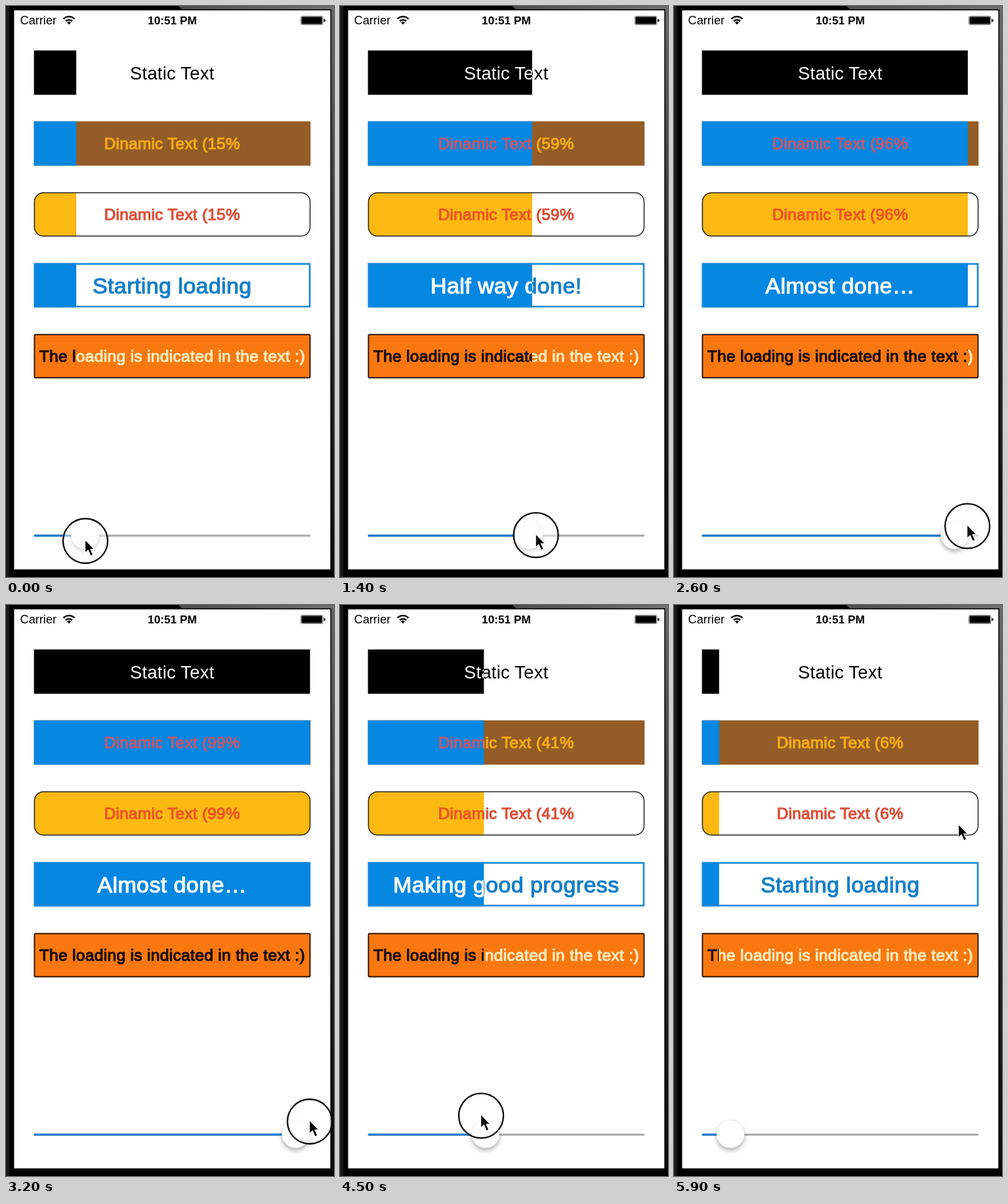
An HTML page that plays this animation: 500x870 px, repeating every 6 s.

```html
<!DOCTYPE html>
<html lang="en">
<head>
<meta charset="utf-8">
<title>Progress bars</title>
<style>
html, body { margin: 0; width: 100%; height: 100%; overflow: hidden; background: #000; }
svg { display: block; width: 500px; height: 870px; font-family: "Liberation Sans", Arial, sans-serif; }
.mid { text-anchor: middle; }
.medium { stroke-width: 1.15; stroke-linejoin: round; letter-spacing: .012em; }
.thin { letter-spacing: .01em; }
</style>
</head>
<body>
<svg id="stage" viewBox="0 0 500 870" xmlns="http://www.w3.org/2000/svg">
  <defs>
    <clipPath id="done"><rect id="doneBox" x="0" y="0" width="0" height="870"/></clipPath>
    <clipPath id="rest"><rect id="restBox" x="0" y="0" width="500" height="870"/></clipPath>
    <clipPath id="pill"><rect x="43" y="284.2" width="421" height="67" rx="14"/></clipPath>
    <linearGradient id="side" x1="0" y1="0" x2="0" y2="1">
      <stop offset="0" stop-color="#686868"/>
      <stop offset=".45" stop-color="#2c2c2c"/>
      <stop offset="1" stop-color="#080808"/>
    </linearGradient>
    <linearGradient id="top" x1="0" y1="0" x2="1" y2="0">
      <stop offset="0" stop-color="#4c4c4c"/>
      <stop offset="1" stop-color="#707070"/>
    </linearGradient>
    <filter id="shadow" x="-50%" y="-50%" width="200%" height="200%">
      <feDropShadow dx="0" dy="4" stdDeviation="3" flood-color="#000" flood-opacity=".3"/>
    </filter>
  </defs>

  <rect width="500" height="870" fill="#000"/>
  <rect width="5" height="870" fill="#181818"/>
  <path d="M263 0H500V5H268Z" fill="url(#top)"/>
  <rect x="496" y="5" width="4" height="858" fill="url(#side)"/>
  <rect x="12.4" y="6.6" width="482" height="851.8" fill="#fff"/>

  <text x="21.5" y="28" font-size="18.2">Carrier</text>
  <g fill="none" stroke="#000" stroke-width="2.4">
    <path d="M87.5 19.6A12.2 12.2 0 0 1 104.5 19.6"/>
    <path d="M91 23.1A7.2 7.2 0 0 1 101 23.1"/>
  </g>
  <path d="M96 28.2L93 25.2A4.3 4.3 0 0 1 99 25.2Z"/>
  <text class="mid" x="253.5" y="28" font-size="17.3" font-weight="bold">10:51 PM</text>
  <rect x="449.5" y="15.5" width="33.5" height="13" rx="2" fill="none" stroke="#555" stroke-width=".8"/>
  <rect x="450.5" y="16.5" width="31.5" height="11" rx="1"/>
  <path d="M484.3 19.5Q487 20 487 22T484.3 24.5Z"/>

  <g id="bars"></g>

  <rect x="42.6" y="805.6" width="421.7" height="3" rx="1.4" fill="#a8a8a8"/>
  <rect id="track" x="42.6" y="805.6" height="3" rx="1.4" fill="#0b76cf"/>
  <circle id="thumb" cy="806" r="21.3" fill="#fff" stroke="#000" stroke-opacity=".1" stroke-width=".8" filter="url(#shadow)"/>

  <g id="pointer">
    <circle id="ring" r="34" fill="#fff" fill-opacity=".5" stroke="#0a0a0a" stroke-width="2.3"/>
    <path d="M-.5 -2V18.5L4.2 14.2L8 23L11.8 21.3L8 12.8H14Z" stroke="#fff" stroke-width="1.2"/>
  </g>
</svg>
<script>
const LOOP = 6000, STEP = 100, LEFT = 42.6, WIDTH = 421.7, HEIGHT = 67.6;
const $ = id => document.getElementById(id);

const BLUE = '#0587e2', RED = '#dc4f36';
const bars = [
  { y: 67.7, fill: '#000', on: '#fff', off: '#000', size: 27.3, base: 112, thin: true, label: () => 'Static Text' },
  { y: 175.7, back: '#945d27', fill: BLUE, on: '#c0586c', off: '#f4aa18', size: 24.3, base: 218, label: percent },
  { y: 283.7, fill: '#fbb911', on: '#ee5526', off: RED, size: 24.3, base: 326, label: percent,
    clip: 'pill', edge: '#222', line: 1.5, round: 14 },
  { y: 391.7, fill: BLUE, on: '#fff', off: '#147fc9', size: 34, base: 437.5, label: phase, edge: '#1687d8', line: 2.6, round: 0 },
  { y: 499.7, back: '#f8780f', on: '#180a0c', off: '#fdeabc', size: 24.6, base: 542, edge: '#1c0d04', line: 1.7, round: 2,
    label: () => 'The loading is indicated in the text :)' }
];

function percent(p) { return `Dinamic Text (${Math.floor(p * 100)}%`; }

function phase(p) {
  if (p < .3) return 'Starting loading';
  if (p < .5) return 'Making good progress';
  return p < .75 ? 'Half way done!' : 'Almost done…';
}

function add(parent, tag, attrs) {
  const el = document.createElementNS('http://www.w3.org/2000/svg', tag);
  for (const k in attrs) el.setAttribute(k, attrs[k]);
  return parent.appendChild(el);
}

function build(bar) {
  const g = add($('bars'), 'g', {});
  const box = { x: LEFT, y: bar.y, width: WIDTH, height: HEIGHT };
  if (bar.back) add(g, 'rect', { ...box, rx: bar.round || 0, fill: bar.back });
  if (bar.fill) {
    const holder = add(g, 'g', bar.clip ? { 'clip-path': `url(#${bar.clip})` } : {});
    bar.meter = add(holder, 'rect', { ...box, fill: bar.fill });
  }
  if (bar.edge) {
    const h = bar.line / 2;
    add(g, 'rect', { x: LEFT + h, y: bar.y + h, width: WIDTH - bar.line, height: HEIGHT - bar.line,
      rx: bar.round, fill: 'none', stroke: bar.edge, 'stroke-width': bar.line });
  }
  bar.texts = [['done', bar.on], ['rest', bar.off]].map(([clip, color]) =>
    add(add(g, 'g', { 'clip-path': `url(#${clip})` }), 'text', {
      class: bar.thin ? 'mid thin' : 'mid medium', x: 253.3, y: bar.base,
      'font-size': bar.size, fill: color, stroke: bar.thin ? 'none' : color
    }));
}

// Monotone cubic curve through [time, value] points.
function curve(points) {
  const n = points.length - 1;
  const slope = i => (points[i + 1][1] - points[i][1]) / (points[i + 1][0] - points[i][0]);
  const tangent = i => {
    if (i === 0) return slope(0);
    if (i === n) return slope(n - 1);
    const a = slope(i - 1), b = slope(i);
    return a * b <= 0 ? 0 : 2 * a * b / (a + b);
  };
  return t => {
    if (t >= points[n][0]) return points[n][1];
    let i = 0;
    while (t >= points[i + 1][0]) i++;
    const [t0, v0] = points[i], [t1, v1] = points[i + 1];
    const d = t1 - t0, u = (t - t0) / d, w = 1 - u;
    return v0 * w * w * (1 + 2 * u) + v1 * u * u * (3 - 2 * u)
      + d * u * w * (w * tangent(i) - u * tangent(i + 1));
  };
}

const progress = curve([[0, .153], [800, .393], [2000, .786], [2800, .99], [3000, .998], [3200, .998],
  [4000, .637], [5100, .171], [5400, .062]]);
const pointerX = curve([[0, 121], [800, 214], [2000, 380], [2800, 459], [3000, 463], [3200, 463],
  [4000, 306], [5100, 113], [5400, 68], [5500, 100], [5900, 434]]);
const pointerY = curve([[0, 815], [800, 812], [2000, 799], [3200, 787], [4000, 783], [5100, 770],
  [5400, 764], [5500, 735], [5900, 336]]);

function draw(t) {
  const p = progress(t), width = WIDTH * p, edge = LEFT + width, knob = 62.5 + 380 * p;
  $('doneBox').setAttribute('width', edge);
  $('restBox').setAttribute('x', edge);
  for (const bar of bars) {
    if (bar.meter) bar.meter.setAttribute('width', width);
    for (const text of bar.texts) text.textContent = bar.label(p);
  }
  $('track').setAttribute('width', knob - LEFT);
  $('thumb').setAttribute('cx', knob);
  $('pointer').setAttribute('transform', `translate(${pointerX(t)} ${pointerY(t)})`);
  $('ring').setAttribute('visibility', t < 5500 ? 'visible' : 'hidden');
}

bars.forEach(build);
const start = performance.now();
function tick() {
  const t = (performance.now() - start) % LOOP;
  draw(Math.floor(t / STEP) * STEP);
  requestAnimationFrame(tick);
}
tick();
</script>
</body>
</html>
```
